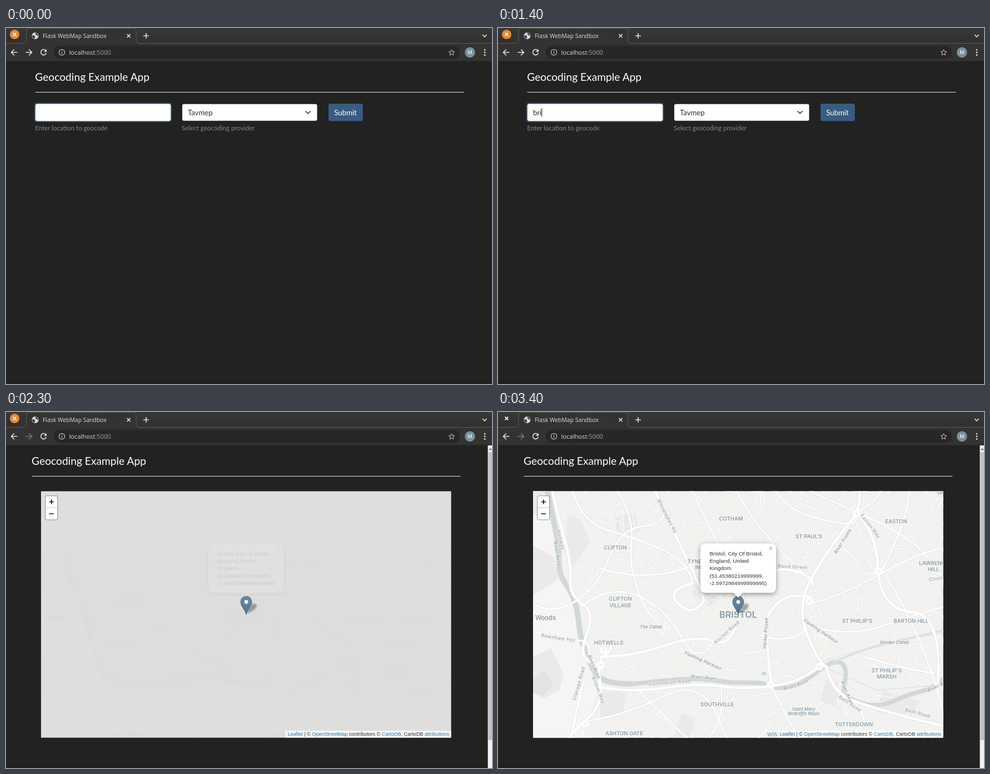
Animation of 874x640 px, one loop 3500 ms. Source, as an HTML page:

```html
<!DOCTYPE html>
<html lang="en">
<head>
<meta charset="utf-8">
<title>Geocoding demo</title>
<style>
html, body { margin: 0; width: 100%; height: 100%; overflow: hidden; background: #222; }
svg { display: block; }
text { white-space: pre; }
.lato { font-family: Lato, sans-serif; font-size: 13.2px; }
.ui { font-family: "Open Sans", "Noto Sans", sans-serif; fill: #dcdcda; }
.arial { font-family: "Liberation Sans", Arial, sans-serif; }
.label { font-family: Inter, sans-serif; paint-order: stroke; stroke: #f6f6f4; stroke-width: 1.6px; stroke-linejoin: round; }
.line { fill: none; stroke-linecap: round; stroke-linejoin: round; }
.icon { fill: none; stroke: #e4e4e2; stroke-width: 1.6; }
</style>
</head>
<body>
<svg id="stage" width="874" height="640" viewBox="0 0 874 640">
  <defs>
    <clipPath id="mapClip"><rect x="63" y="142.5" width="737.5" height="443"/></clipPath>
    <filter id="soft" x="-30%" y="-30%" width="160%" height="160%"><feDropShadow dx="0" dy="2.5" stdDeviation="5" flood-opacity=".4"/></filter>
    <filter id="blur" x="-50%" y="-50%" width="200%" height="200%"><feGaussianBlur stdDeviation="1.8"/></filter>
    <linearGradient id="pin" x2="0" y2="1"><stop stop-color="#6a8ca8"/><stop offset="1" stop-color="#4f718d"/></linearGradient>
    <linearGradient id="strip" x2="0" y2="1"><stop stop-color="#383836"/><stop offset="1" stop-color="#30302e"/></linearGradient>
  </defs>
  <rect width="874" height="640" fill="#222221"/>
  <rect y="636" width="874" height="4" fill="#1f1f1f"/>

  <rect width="874" height="28" fill="url(#strip)"/>
  <rect y="27" width="874" height="32.5" fill="#333332"/>
  <path d="M0 27.5H31Q37 27.5 37 21V6Q37 .5 43 .5H228Q234 .5 234 6V21Q234 27.5 240 27.5H874" fill="#333332" stroke="#5c5c5a"/>
  <circle id="closeDisc" cx="15.5" cy="11.5" r="8.6" fill="#e58a32"/>
  <path d="M12.7 8.7l5.6 5.6m0-5.6l-5.6 5.6" stroke="#fff" stroke-width="1.9"/>
  <g id="globe">
    <circle cx="52.5" cy="14" r="6" fill="#dededc"/>
    <path d="M48 12.5l3 1.2 1.5 2-1 3.6q-4-1-4.2-5zM52 8.8l1.5 1.6-1 1.6 2.5.5 2 2.5.6-2q-.8-3.6-4-4.6z" fill="#3a3a39"/>
  </g>
  <path id="spinner" class="line" d="M48.3 11.5A5.5 5.5 0 0 1 53.5 8.6" stroke="#cfd3d6" stroke-width="1.5"/>
  <text id="tabTitle" class="ui" x="66" y="17.5"></text>
  <path class="icon" d="M217.6 11l6 6m0-6l-6 6"/>
  <path class="icon" stroke-width="1.8" d="M252 9v10m-5-5h10"/>
  <path class="icon" d="M857 12l3.8 3.8 3.8-3.8"/>

  <rect x="86" y="31.5" width="730" height="24.5" rx="12.2" fill="#272726"/>
  <path class="icon" d="M20.5 43.8H9.5m5.3-5.3l-5.3 5.3 5.3 5.3"/>
  <path id="forward" class="icon" d="M35.5 43.8h11m-5.3-5.3l5.3 5.3-5.3 5.3"/>
  <g id="reload"><path class="icon" d="M71.5 40.3A5 5 0 1 0 72.5 45"/><path d="M73 38v5h-5z" fill="#e4e4e2"/></g>
  <path id="stop" class="icon" d="M63.2 39.5l8.6 8.6m0-8.6l-8.6 8.6"/>
  <circle cx="100.5" cy="43.7" r="5.2" class="icon" style="stroke:#c4c4c2;stroke-width:1.2"/>
  <path d="M100.5 43v3.6m0-6v1.3" stroke="#c4c4c2" stroke-width="1.3"/>
  <text class="ui" x="113.5" y="47.6" font-size="11.2">localhost<tspan fill="#a0a09e">:5000</tspan></text>
  <path d="M801.5 38.8l1.5 3.4 3.7.4-2.8 2.5.8 3.7-3.2-1.9-3.2 1.9.8-3.7-2.8-2.5 3.7-.4z" class="icon" style="stroke:#c9c9c7;stroke-width:1"/>
  <circle cx="834.3" cy="43.8" r="9.3" fill="#78909c"/>
  <text x="834.3" y="47.2" text-anchor="middle" font-family="Roboto, sans-serif" font-size="9.5" fill="#fff">M</text>
  <g fill="#e4e4e2"><circle cx="861" cy="39.3" r="1.4"/><circle cx="861" cy="44" r="1.4"/><circle cx="861" cy="48.7" r="1.4"/></g>

  <g id="header">
    <text class="lato" x="52.3" y="94.5" style="font-size:19.2px" fill="#fff">Geocoding Example App</text>
    <rect x="52.5" y="115" width="771" height="1" fill="#e4e4e2"/>
  </g>

  <g id="form" class="lato">
    <rect x="50" y="133.5" width="249" height="36.5" rx="5" fill="#375a7f" opacity=".35"/>
    <rect x="52.8" y="136.3" width="243.5" height="31" rx="3.2" fill="#fff" stroke="#9bb0c6" stroke-width=".9"/>
    <text id="typed" x="63" y="156.5" fill="#303030"></text>
    <rect id="caret" y="144" width="1" height="15.5" fill="#222"/>
    <rect x="317" y="136.8" width="242.5" height="30" rx="3" fill="#fff"/>
    <text x="327" y="156.5" fill="#303030">Tavmep</text>
    <path class="line" d="M539 149.8l4 4 4-4" stroke="#303030" stroke-width="1.6"/>
    <rect x="580" y="136" width="61.7" height="31.3" rx="3.3" fill="#3a5b80"/>
    <text x="610.5" y="156.5" text-anchor="middle" fill="#fff">Submit</text>
    <g style="font-size:11.55px" fill="#868684">
      <text x="52.3" y="183.8">Enter location to geocode</text>
      <text x="316" y="183.8">Select geocoding provider</text>
    </g>
  </g>

  <g id="result">
    <rect x="866.5" y="60" width="7.5" height="580" fill="#f1f1f0"/>
    <rect x="867.5" y="72" width="6.5" height="518" fill="#c1c1c0"/>
    <path d="M868 68.5l3-4 3 4z" fill="#777"/>
    <rect x="63" y="142.5" width="737.5" height="443" fill="#dddddc"/>
    <g clip-path="url(#mapClip)"><g id="map"></g></g>
    <path d="M432 363L439 350Q445 341 450 346Q453 351 444 357z" fill="#000" opacity=".32" filter="url(#blur)"/>
    <path d="M432 363.8C430 356 422 349 422 341.2A10 10 0 0 1 442 341.2C442 349 434 356 432 363.8z" fill="url(#pin)" stroke="#4a6880" stroke-width=".9"/>
    <circle cx="432" cy="341.5" r="3.4" fill="#fff"/>
    <g id="popup" class="arial" font-size="9.9" fill="#333">
      <path d="M374 236.5H490Q500 236.5 500 246.500V315Q500 325 490 325H440L432 333.500 424 325H374Q364 325 364 315V246.500Q364 236.500 374 236.500z" fill="#fff" filter="url(#soft)"/>
      <path d="M487.8 242.3l5.6 5.6m0-5.6l-5.6 5.6" stroke="#c3c3c3" stroke-width="1.6"/>
    </g>
    <rect x="70" y="150" width="23.5" height="44.5" rx="4" fill="#000" opacity=".28"/>
    <rect x="71.3" y="151.3" width="20.8" height="42" rx="2.5" fill="#fff"/>
    <path d="M71.3 172H92" stroke="#ccc"/>
    <path d="M77.8 161.5h8m-4-4v8M77.8 183h8" stroke="#111" stroke-width="1.7"/>
    <rect x="502" y="573" width="298.5" height="12.5" fill="#fff" opacity=".7"/>
    <text class="arial" x="797" y="582.4" text-anchor="end" font-size="9.06" fill="#333"><tspan class="link">Leaflet</tspan> | © <tspan class="link">OpenStreetMap</tspan> contributors © <tspan class="link">CartoDB</tspan>, CartoDB <tspan class="link">attributions</tspan></text>
  </g>
</svg>
<script>
const $ = id => document.getElementById(id);
const map = $('map');

function add(parent, tag, attrs, text) {
  const el = document.createElementNS('http://www.w3.org/2000/svg', tag);
  for (const key in attrs) el.setAttribute(key, attrs[key]);
  if (text) el.textContent = text;
  parent.append(el);
  return el;
}
const line = (d, stroke, width) => add(map, 'path', { d, stroke, 'stroke-width': width, class: 'line' });
const area = (d, fill) => add(map, 'path', { d, fill });

let seed = 41;
const random = () => (seed = (seed * 16807) % 2147483647) / 2147483647;

// Side streets follow a smooth direction field, half of them crossing it.
function sideStreets(count) {
  let d = '';
  for (let i = 0; i < count; i++) {
    const x = 120 + random() * 690, y = 135 + random() * 460;
    const angle = Math.sin(x / 95) + Math.cos(y / 75) + (random() < .5 ? Math.PI / 2 : 0);
    const size = 12 + random() * 36;
    const dx = Math.cos(angle) * size, dy = Math.sin(angle) * size;
    d += `M${x.toFixed(1)} ${y.toFixed(1)}q${(dx / 2 + 2).toFixed(1)} ${(dy / 2 - 2).toFixed(1)} ${dx.toFixed(1)} ${dy.toFixed(1)}`;
  }
  return d;
}

function drawMap() {
  const water = '#d2d8da', park = '#eaeae8', casing = '#e3e3e1';
  add(map, 'rect', { x: 63, y: 142, width: 738, height: 445, fill: '#f2f2f0' });
  area('M355 290L395 280 410 330 380 350 350 330zM690 500L760 520 740 550 680 540zM210 190L245 180 255 215 215 225z', park);
  const streets = sideStreets(1350);
  line(streets, '#e4e4e2', 2.5);
  line(streets, '#fbfbfa', 1.4);

  area('M60 140H88Q101 190 106 240 108 290 138 335L146 400 166 465 180 500 150 590H60z', '#f5f5f3');
  area('M60 140H86L92 178 76 190 60 182zM63 240L100 260 108 300 63 330zM63 440L95 425 118 470 110 500 82 515 63 498zM125 185L150 195 165 235 135 280 122 245z', park);
  area('M63 480L85 465 100 490 80 512 63 505z', '#e3e3e1');
  area('M180 500L230 505 225 540 185 555zM330 540L355 550 345 586 315 586zM590 480L612 485 608 530 580 520z', park);

  line('M88 138Q98 185 106 225C114 260 102 280 121 308S143 355 146 385 158 430 168 456 195 488 240 489', water, 10);
  line('M240 489C290 485 345 474 400 484 440 491 465 480 492 494 530 502 552 484 575 466S622 440 625 466 610 506 634 516 680 535 720 516 775 508 805 476', water, 8);
  line('M605 449Q660 425 700 416T802 392', '#dfe1e1', 4);
  line('M578 452Q660 420 802 397M590 460L680 500 802 490', '#dededd', 1.2);

  const minor = [
    'M63 345Q100 365 140 340T200 262 262 205 300 170', 'M63 392Q100 412 135 410T163 440',
    'M135 142Q150 200 205 215T300 250 350 305', 'M215 142Q245 190 240 235T255 330 310 390',
    'M180 280Q240 300 300 290T364 255', 'M150 350Q200 310 250 330T330 405 388 411',
    'M430 142Q452 190 495 235T560 300', 'M350 142Q372 190 395 236', 'M500 142Q520 180 590 195T640 182',
    'M640 180Q700 200 745 235T802 310', 'M690 142Q675 165 645 180 600 160 560 142',
    'M560 345Q620 330 690 290T802 245', 'M558 385Q630 405 690 385T802 350', 'M740 142Q735 200 690 285',
    'M490 490Q510 530 540 586', 'M400 490Q410 545 380 586', 'M250 497Q290 540 340 586', 'M165 555Q230 545 300 510T400 560 490 560',
    'M640 520Q665 550 660 586', 'M700 300Q745 370 775 455T802 570', 'M660 440Q720 460 785 470', 'M470 400Q520 420 556 390'
  ];
  const major = [
    'M98 142Q108 190 120 230T130 300 152 345 158 405 185 455', 'M283 142Q300 185 318 220T352 290 370 340',
    'M650 142Q652 170 640 190 590 250 563 300T556 400 590 458', 'M645 180Q680 215 684 285T745 360 790 500',
    'M155 556Q135 575 125 590M155 556Q190 530 184 490T190 440 205 418', 'M130 590Q143 530 155 480',
    'M180 494Q240 505 300 496T400 493 490 493 575 460', 'M590 457Q600 500 630 515T802 565',
    'M185 440Q240 440 300 420T388 412 430 378 440 325', 'M440 325Q490 275 530 285T565 310',
    'M370 340Q350 370 325 345T350 308', 'M484 368Q505 330 540 330T556 345M484 368Q482 430 492 490'
  ];
  minor.forEach(d => line(d, casing, 4.4));
  major.forEach(d => line(d, casing, 6.2));
  minor.forEach(d => line(d, '#fff', 3));
  major.forEach(d => line(d, '#fff', 4.6));
  for (const [x, y] of [[645, 182], [684, 286], [560, 340], [578, 458], [185, 455], [157, 560], [490, 490], [190, 428]])
    add(map, 'circle', { cx: x, cy: y, r: 5, fill: '#f4f4f2', stroke: '#fff', 'stroke-width': 3.5 });
}

function label(text, x, y, { size = 9.6, turn = 0, fill = '#8094a0', italic = false, anchor = 'middle', gap = 0, weight = 500 } = {}) {
  add(map, 'text', {
    class: 'label', 'text-anchor': anchor, 'font-size': size, fill, 'font-weight': weight, 'letter-spacing': gap,
    'font-style': italic ? 'italic' : 'normal', transform: `translate(${x} ${y}) rotate(${turn})`, y: size * .36
  }, text);
}
const road = (text, x, y, turn) => label(text, x, y, { turn, size: 8.4, fill: '#a0a3a5', gap: .6 });
const river = (text, x, y, turn = 0, gap = .5) => label(text, x, y, { turn, size: 8, fill: '#7d949f', italic: true, gap });

function drawLabels() {
  road('Portway', 113, 230, 76);
  road('Whiteladies Rd', 304, 187, 63);
  road('Rownham Hill', 108, 406, 9);
  road('Clanage Road', 145, 488, -74);
  road('Brunel Way', 181, 500, 69);
  road('Coronation Road', 309, 486, -5);
  road('Anchor Road', 411, 396, -42);
  road('Bond Street', 530, 278, 3);
  road('Easton Way', 670, 205, 52);
  road('Bath Road', 633, 524, 33);
  road('Bath Road', 755, 541, 15);
  road('Church Road', 804, 297, -8);
  river('River Avon', 107, 255, 80);
  river('River Avon', 173, 458, 66);
  river('River Avon', 370, 477, 5);
  river('River Avon', 536, 490, -20);
  river('River Avon', 628, 505, 68);
  river('River Avon', 794, 491, -25);
  river('River Frome', 620, 232, -58);
  river('Floating Harbour', 369, 447, 24);
  river('Floating Harbour', 581, 394, 34);
  river('oating Harbo', 482, 398, 94);
  river('in', 479, 470);
  river('The Canal', 275, 386, 0, 0);
  river('Feeder Canal', 713, 414, 0, 0);
  river('Saint Mary', 550, 534, 0, 0);
  river('Redcliffe Maze', 550, 542, 0, 0);
  const places = [
    ['COTHAM', 419, 192], ['EASTON', 716, 197], ["ST PAUL'S", 559, 224], ['CLIFTON', 211, 244],
    ['TYNDALLS', 366, 269], ['PARK', 367, 280], ['CLIFTON', 220, 336], ['VILLAGE', 220, 347.5],
    ['HOTWELLS', 199, 414.5], ["ST PHILIP'S", 646, 376], ['BARTON HILL', 743, 375.5],
    ['LAWRENCE', 784, 272], ['HILL', 783, 283], ["ST PHILIP'S", 699, 464.5], ['MARSH', 699, 476],
    ['SOUTHVILLE', 394, 525.5], ['TOTTERDOWN', 640, 562], ['ASHTON GATE', 227, 578]
  ];
  for (const [text, x, y] of places) label(text, x, y);
  label('WINDMILL', 484, 580, { anchor: 'start' });
  label('GREENBANK', 790, 145, { anchor: 'start' });
  label('Leigh Woods', 104, 370, { anchor: 'end', size: 11.2 });
  label('BRISTOL', 432, 364.5, { size: 16.2, weight: 600, fill: '#8a9aa4' });
}

drawMap();
drawLabels();
['Bristol, City Of Bristol,', 'England, United', 'Kingdom', '(51.45380219999999,', '-2.5972984999999995)']
  .forEach((text, i) => add($('popup'), 'text', { x: 380.5, y: 258 + i * 13.2 }, text));
document.querySelectorAll('.link').forEach(el => el.setAttribute('fill', '#2f78a8'));

const LOOP = 3500;
const typing = [[0, ''], [900, 'b'], [1100, 'br'], [1400, 'bri'], [1600, 'bris'], [1700, 'bristo'], [1800, 'bristol']];
const show = (id, on) => { $(id).style.display = on ? '' : 'none'; };

function render(t) {
  const loading = t >= 2100 && t < 2300, loaded = t >= 2300;
  const step = Math.floor((t - 2300) / 100);

  $('typed').textContent = typing.filter(([at]) => at <= t).pop()[1];
  show('form', !loaded);
  show('caret', t >= 200);
  if (!loaded) $('caret').setAttribute('x', 63 + ($('typed').textContent ? $('typed').getComputedTextLength() : 0));

  show('result', loaded);
  $('header').setAttribute('transform', `translate(${loaded ? -6.2 : 0} 0)`);
  if (loaded) {
    map.setAttribute('opacity', [.04, .55, .97][step] ?? 1);
    $('popup').setAttribute('opacity', [.1, .6, 1][step] ?? 1);
  }

  $('tabTitle').textContent = loading ? 'localhost:5000' : 'Flask WebMap Sandbox';
  $('tabTitle').setAttribute('font-size', loading ? 10.7 : 10.4);
  show('globe', !loading);
  show('spinner', loading);
  $('spinner').setAttribute('transform', `rotate(${t < 2200 ? 60 : 0} 53 14)`);
  show('reload', !loading);
  show('stop', loading);
  $('forward').style.stroke = t >= 2100 ? '#777775' : '';
  show('closeDisc', t < 3400);
}

const start = performance.now();
function tick() {
  render((performance.now() - start) % LOOP);
  requestAnimationFrame(tick);
}
tick();
</script>
</body>
</html>
```
